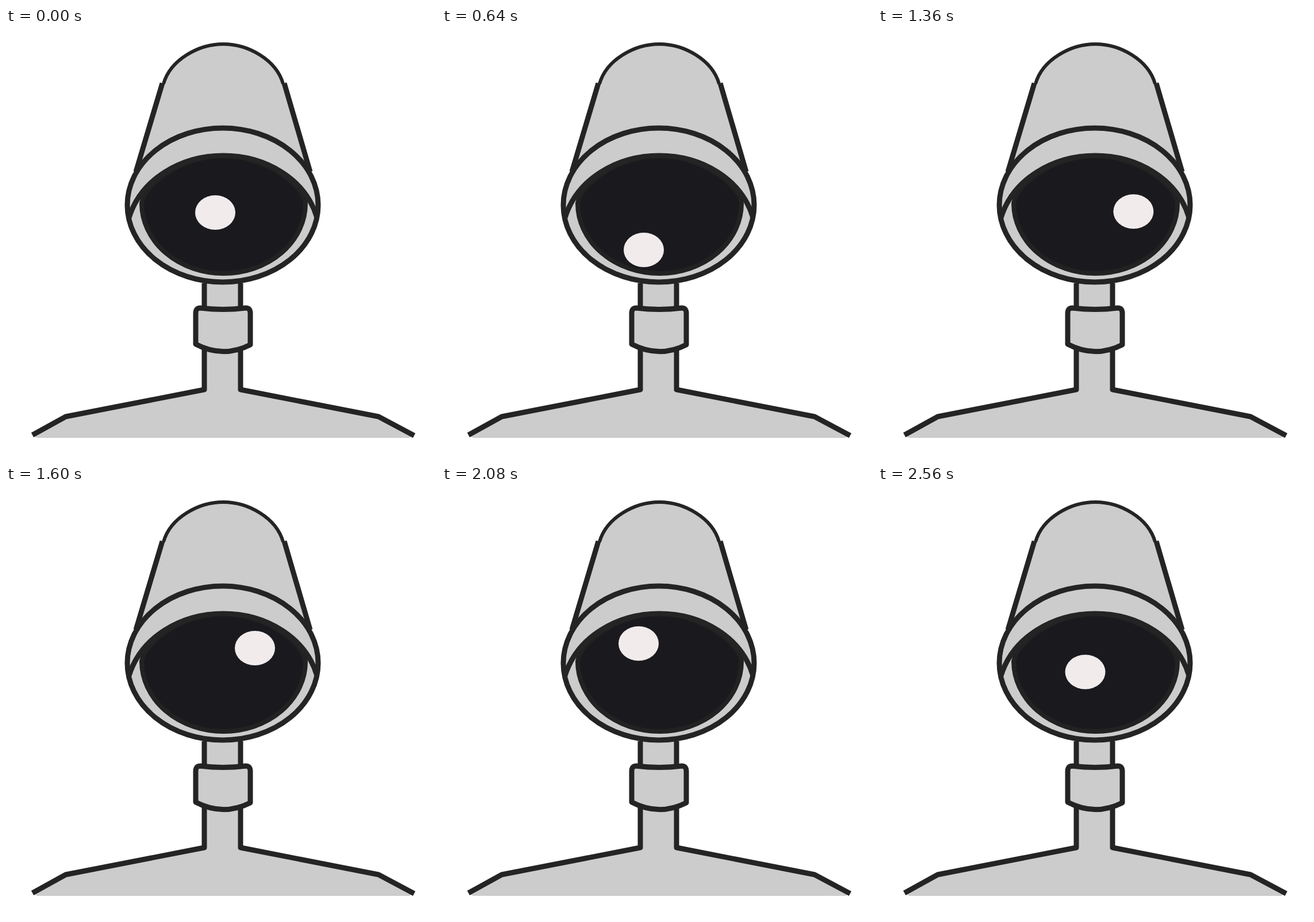
These frames come from a looping animation (748x748 px, 2640 ms). An HTML page:

```html
<!DOCTYPE html>
<html lang="en">
<head>
<meta charset="utf-8">
<title>Camera</title>
<style>
  html, body { margin: 0; width: 100%; height: 100%; overflow: hidden; background: #fff; }
  svg { display: block; width: 100%; height: 100%; }
  .fill { fill: #ccc; }
  .line { fill: none; }
  .shape { fill: #ccc; }
  .line, .shape { stroke: #242424; stroke-width: 9; stroke-linejoin: round; }
  .thin { stroke-width: 6; }
  .lens { fill: #1a1a1e; stroke: #222; stroke-width: 8; }
</style>
</head>
<body>
<svg viewBox="0 0 748 748">
  <!-- base and neck -->
  <path class="fill" d="M47 708 L104 676 L345 629 V440 H408 V629 L648 676 L709 709 L702 713 H54 Z"/>
  <path class="line" d="M46 708 L104 676 L345 629 V444 M408 444 V629 L648 676 L710 709"/>
  <path class="shape" d="M330 550 V496 Q330 487 338 487 Q378 492 417 487 Q425 487 425 496 V551 Q378 575 330 550 Z"/>
  <!-- housing -->
  <path class="fill" d="M226 250 L274 97 C286 55 335 28 378 28 S470 55 482 97 L529 250 Z"/>
  <path class="line thin" d="M274 97 C286 55 335 28 378 28 S470 55 482 97"/>
  <path class="line" d="M226 250 L272 96 M484 96 L529 250"/>
  <ellipse class="shape" cx="377" cy="308" rx="166" ry="134"/>
  <!-- lens -->
  <path class="lens" d="M236 305 C240 270 310 222 378 222 S517 270 521 305 A142.5 122 0 0 1 236 305 Z"/>
  <path class="line" d="M214 330 C235 262 305 222 378 222 S521 262 541 330"/>
  <ellipse id="dot" rx="35" ry="30" fill="#f1ebec"/>
</svg>
<script>
  const LOOP = 2640, STEP = 80;
  // Key poses of the light: it leaves the centre, circles the lens and returns
  const keys = [
    { t: 1, x: 364, y: 321 }, { t: 5, x: 318, y: 365.5 }, { t: 8, x: 351, y: 386 },
    { t: 14, x: 434, y: 359 }, { t: 20, x: 433, y: 282 }, { t: 26, x: 342, y: 274 },
    { t: 32, x: 360.5, y: 323.5 }
  ];
  const dot = document.getElementById('dot');
  const start = performance.now();

  function slope(i, axis) {
    const a = keys[Math.max(i - 1, 0)], b = keys[Math.min(i + 1, keys.length - 1)];
    return (b[axis] - a[axis]) / (b.t - a.t);
  }

  // Smooth Hermite curve through the key poses
  function position(t, axis) {
    const i = Math.max(1, keys.findIndex(key => key.t >= t));
    const a = keys[i - 1], b = keys[i], span = b.t - a.t;
    const u = (t - a.t) / span, v = 1 - u;
    return a[axis] * v * v * (1 + 2 * u) + b[axis] * u * u * (1 + 2 * v) +
      span * u * v * (v * slope(i - 1, axis) - u * slope(i, axis));
  }

  function draw() {
    const tick = Math.floor((performance.now() - start) % LOOP / STEP);
    // The light rests at the start and once at the bottom
    const t = tick === 11 ? 10 : Math.max(tick, keys[0].t);
    dot.setAttribute('cx', position(t, 'x'));
    dot.setAttribute('cy', position(t, 'y'));
    requestAnimationFrame(draw);
  }
  draw();
</script>
</body>
</html>
```
